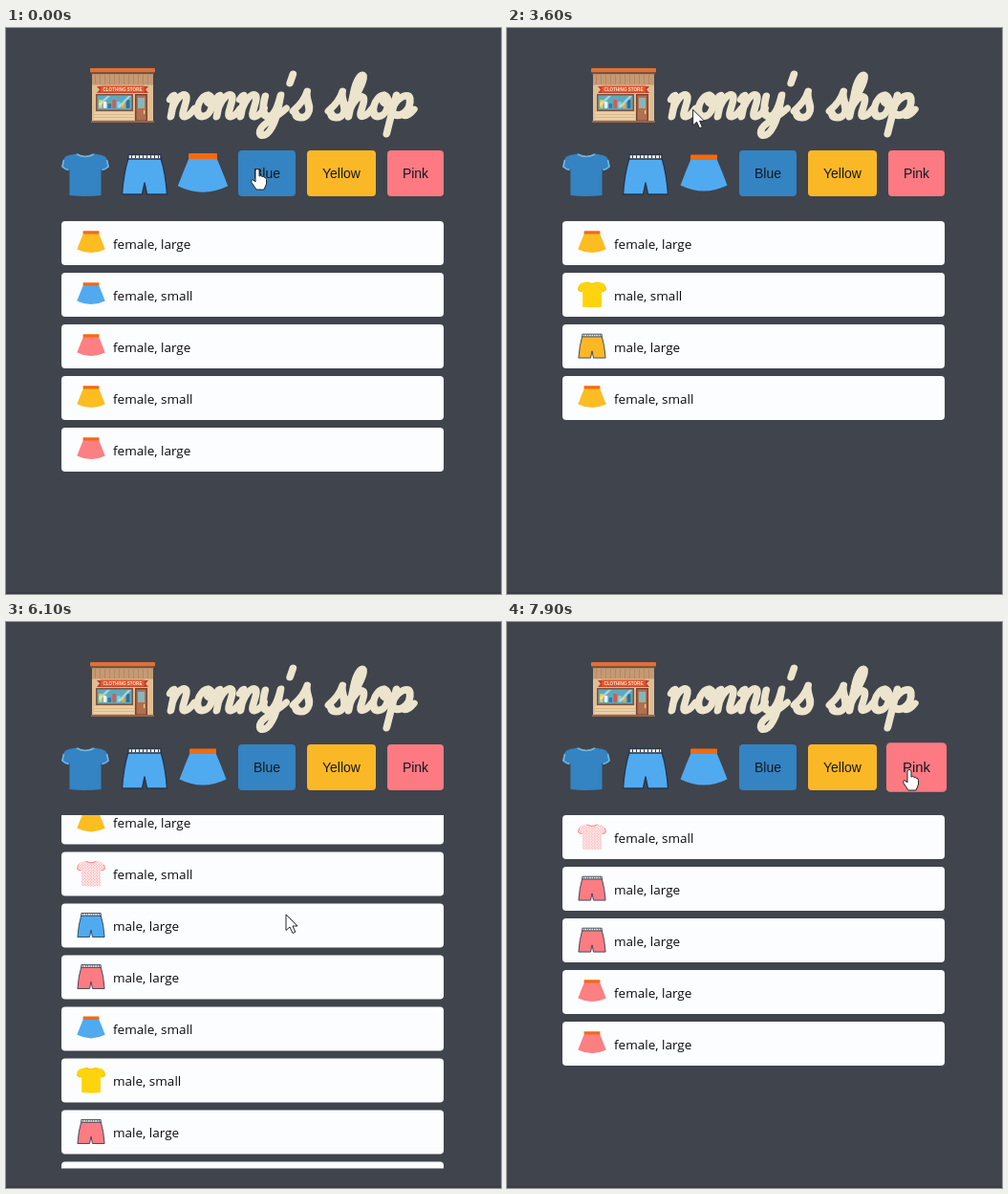
These frames come from a looping animation (518 by 592 pixels, 8000 ms). An HTML page:

```html
<!DOCTYPE html>
<html lang="en">
<head>
<meta charset="utf-8">
<title>nonny's shop</title>
<style>
  html, body { margin: 0; width: 100%; height: 100%; overflow: hidden; background: #40444c; }
  svg { display: block; width: 518px; height: 592px; }
  .row { font: 13.5px "Open Sans", "Noto Sans", sans-serif; fill: #0b0b0d; }
  .btn { font: 14px "Liberation Sans", Arial, sans-serif; fill: #15171c; text-anchor: middle; }
  .sign { font: bold 4.6px "Liberation Sans", Arial, sans-serif; fill: #fbe9d0; text-anchor: middle; }
  .script { fill: none; stroke: #ece4cc; stroke-width: 7.8; stroke-linecap: round; stroke-linejoin: round; }
</style>
</head>
<body>
<svg id="stage" viewBox="0 0 518 592"></svg>
<script>
const LOOP = 8000, STEP = 100;
const stage = document.getElementById('stage');
const rect = (x, y, w, h, fill, r = 0) =>
  `<rect x="${x}" y="${y}" width="${w}" height="${h}" rx="${r}" fill="${fill}"/>`;
const path = (d, fill, extra = '') => `<path d="${d}" fill="${fill}" ${extra}/>`;
const at = (x, y, body, s = 1) => `<g transform="translate(${x} ${y}) scale(${s})">${body}</g>`;

// Garments live in a 50 x 50 box.
const cloth = {
  tee: { blue: '#3483c2', yellow: '#ffd40c', pink: 'url(#dots)' },
  shorts: { blue: '#50aaf0', yellow: '#fbb726', pink: '#fb7c83' },
  skirt: { blue: '#50aaf0', yellow: '#fbbd22', pink: '#fc7f82' }
};
const cuffs = { blue: '#72b4e2', yellow: '#f3c404', pink: '#fa8d92' };

const garment = {
  tee(c) {
    return path('M16 3.5Q25 8 34 3.5L42 5Q46.500 6 47.500 9L50 17Q47 20.500 42.500 21L41.500 19V47Q25 49 8.500 47V19L7.500 21Q3 20.500 0 17L2.500 9Q3.500 6 8 5Z', cloth.tee[c]) +
      path('M16 4Q25 9 34 4M2.500 10L1 17Q4 20 7.500 20.300M47.500 10L49 17Q46 20 42.500 20.300', 'none', `stroke="${cuffs[c]}" stroke-width="1.700"`);
  },
  shorts(c) {
    const line = 'stroke="#26364f" stroke-width="1.400" stroke-linejoin="round"';
    return path('M8 8H42Q47 24 48.500 46H27.500L25 34L22.500 46H1.500Q3 24 8 8Z', cloth.shorts[c], line) +
      path('M8 4.500H42V9H8Z', '#f6f1e6', line) +
      path('M11 6.700H41', 'none', 'stroke="#34373d" stroke-width="3" stroke-dasharray="1 3"');
  },
  skirt(c) {
    return path('M11.500 9H38.500Q44 22 49.500 36.500Q25 48.500 .5 36.500Q6 22 11.500 9Z', cloth.skirt[c]) +
      rect(11, 4.5, 28, 5.5, '#f26a12', 1);
  }
};

function shop() {
  let s = rect(90, 47, 64, 51, '#e0bd92') + rect(88, 42, 68, 4.5, '#df7038', 1) + rect(89, 46.5, 66, 2, '#7d4c36');
  s += rect(90, 48.5, 64, 11, '#c49a74');
  for (let x = 93; x < 153; x += 5) s += rect(x, 49, .8, 10, '#b1845f');
  s += path('M95 61H149L146 64.500L149 68H95L98 64.500Z', '#b93f2b') + rect(99, 60.5, 46, 7, '#e2542f');
  s += '<text class="sign" x="122" y="65.700">CLOTHING STORE</text>';
  s += rect(94, 69, 39, 18, '#80533e') + rect(95.5, 70.5, 36, 15, '#5fa9bd');
  ['#e9c84a', '#f4f3e6', '#3a78a5', '#d9594d', '#8bcfca', '#eda53e', '#316f90'].forEach((c, i) => {
    s += rect(97 + i * 4.8, 75 + i % 3 * 2, 3.6, 9 - i % 3 * 2, c, 1);
  });
  s += path('M97 79L106 71H109L98 82ZM117 82L128 71H131L120 83Z', '#e6f7f6', 'opacity=".55"');
  s += rect(92, 88, 42, 9, '#ecd0a6');
  for (let y = 90; y < 97; y += 3) s += rect(92, y, 42, .7, '#d3ad83');
  s += rect(135, 69, 13, 28, '#79452f') + rect(136.5, 70.5, 10, 26, '#b3704e') + rect(138, 73, 7, 11, '#87b6bd');
  return s + rect(144, 86, 1.2, 4, '#f0d48d') + rect(89, 97, 66, 2, '#906650');
}

const glyphs = {
  n: 'M0-18Q3-25 4.500-19L4 0M4-7C6-18 11-24 15-22C19-20 16-10 16-4C16 2 22 2 27-8',
  o: 'M11-22C1-22-1 0 9 0C19 0 20-19 11-22C9-14 16-11 23-16',
  y: 'M1-21C0-8 2 0 8 0C13 0 16-8 17-22C17-4 17 10 10 18C4 23-1 16 4 10C8 5 18 0 25-8',
  "'": 'M4-44L2.500-35',
  s: 'M0-6C6-12 10-18 11-26C10-18 19-10 16-3C14 3 5 2 3-3',
  h: 'M0-8C8-18 14-36 12-42C9-46 5-38 5-26L4 0M4-6C6-16 11-22 15-20C19-18 16-8 16-4C16 2 22 1 27-8',
  p: 'M4-22L1 18M3-10C6-20 16-26 19-18C22-8 14 1 6-2M15-2Q20 1 25-7'
};
const places = [0, 28, 48, 73, 98, 120, 131, 0, 168, 186, 212, 232];
const title = `<g role="img" aria-label="nonny's shop" class="script" transform="translate(168.500 92.500) skewX(-10)">` +
  [..."nonny's shop"].map((c, i) => c === ' ' ? '' : `<path transform="translate(${places[i]})" d="${glyphs[c]}"/>`).join('') + '</g>';

const button = (x, w, fill, label) =>
  rect(x, 128, w, 48, fill, 4) + `<text class="btn" x="${x + w / 2}" y="157">${label}</text>`;

// kind, colour, label
const items = [
  'skirt yellow female, large', 'tee pink female, small', 'shorts blue male, large',
  'shorts pink male, large', 'skirt blue female, small', 'tee yellow male, small',
  'shorts pink male, large', 'shorts yellow male, large', 'tee blue female, large',
  'skirt pink female, large', 'skirt yellow female, small', 'tee blue male, large',
  'skirt pink female, large'
].map(s => {
  const [kind, color, sex, size] = s.split(' ');
  return { kind, color, label: sex + ' ' + size };
});

const row = (it, i) => at(58, 202 + 54 * i,
  rect(0, 0, 400, 46, '#fcfdff', 4) + at(16, 7.5, garment[it.kind](it.color), .6) +
  `<text class="row" x="54" y="29">${it.label}</text>`);

const views = {
  skirt: it => it.kind === 'skirt',
  blue: it => it.color === 'blue',
  yellow: it => it.color === 'yellow',
  all: () => true,
  pink: it => it.color === 'pink'
};

// Hover targets: box, art, time entered, time left
const targets = [
  { box: [88, 42, 68, 56], art: shop(), on: 3600, off: 5500 },
  { box: [58, 128, 50, 50], art: at(58, 128, garment.tee('blue')) },
  { box: [120, 128, 50, 50], art: at(120, 128, garment.shorts('blue')) },
  { box: [181, 128, 50, 50], art: at(181, 128, garment.skirt('blue')), on: -900, off: 0 },
  { box: [243, 128, 60, 48], art: button(243, 60, '#3483c2', 'Blue'), on: 0, off: 2000 },
  { box: [315, 128, 72, 48], art: button(315, 72, '#fbb826', 'Yellow'), on: 2100, off: 3200 },
  { box: [399, 128, 59, 48], art: button(399, 59, '#fd7a82', 'Pink'), on: 7150, off: 9000 }
];

stage.innerHTML = `<defs>
  <pattern id="dots" width="5" height="5" patternUnits="userSpaceOnUse">${rect(0, 0, 5, 5, '#fff1f0')}
    <circle cx="1.300" cy="1.300" r="1.100" fill="#f9a0a4"/><circle cx="3.800" cy="3.800" r="1.100" fill="#f9a0a4"/></pattern>
  <clipPath id="port"><rect x="58" y="202" width="400" height="369.500"/></clipPath></defs>` +
  rect(0, 0, 518, 592, '#40444c') + rect(0, 590, 518, 2, '#3b3c45') + title +
  targets.map(o => `<g class="target">${o.art}</g>`).join('') +
  '<g clip-path="url(#port)">' + Object.keys(views).map(k =>
    `<g id="${k}">${items.filter(views[k]).map(row).join('')}</g>`).join('') + '</g>' +
  '<g id="cursor" stroke="#24262c" stroke-linejoin="round">' +
  path('M-2 1.500Q0-1 2 1.500V8Q4 6.500 5 8.500Q7 7.500 7.500 9.500Q9.500 9 9.500 11.500V16L7 22H-1L-6 14.500Q-7 11-4 12L-2 14Z', '#fff', 'id="hand"') +
  path('M0 0V16.500L4 13L7 19.500L9.800 18.200L7 12H12Z', '#fff', 'id="arrow"') + '</g>';

const $ = id => document.getElementById(id);
const groups = [...document.querySelectorAll('.target')];
const clamp = v => Math.max(0, Math.min(1, v));
const ease = v => v * v * (3 - 2 * v);

// Eased value of a track of [time, ...numbers]
function track(keys, t) {
  let i = 0;
  while (i < keys.length - 2 && t >= keys[i + 1][0]) i++;
  const [a, b] = [keys[i], keys[i + 1]];
  const k = ease(clamp((t - a[0]) / (b[0] - a[0])));
  return a.slice(1).map((v, n) => v + (b[n + 1] - v) * k);
}

const moves = [
  [0, 263, 147], [400, 278, 149], [1900, 278, 149], [2400, 356, 157], [3000, 356, 157],
  [3300, 330, 108], [3800, 121, 73], [4600, 121, 73], [4800, 121, 70],
  [5400, 121, 70], [6000, 293, 306], [6900, 293, 306], [7300, 421, 154], [8000, 421, 154]
];
const scrolls = [[6050, 0], [6250, 100], [6300, 100], [6500, 201], [6550, 201], [6750, 301], [6850, 332]];
const clicks = [[0, 'skirt'], [600, 'blue'], [2500, 'yellow'], [4900, 'all'], [7600, 'pink']];

function draw(t) {
  const [x, y] = track(moves, t);
  let over = false;
  targets.forEach((o, i) => {
    const [bx, by, w, h] = o.box, cx = bx + w / 2, cy = by + h / 2;
    over = over || (x >= bx && x <= bx + w && y >= by && y <= by + h);
    const k = o.off === undefined ? 0 : ease(clamp((t - o.on) / 200)) * (1 - ease(clamp((t - o.off) / 200)));
    groups[i].setAttribute('transform', `translate(${cx} ${cy}) scale(${1 + .07 * k}) translate(${-cx} ${-cy})`);
  });
  const view = clicks.filter(c => c[0] <= t).pop()[1];
  for (const k in views) $(k).style.display = k === view ? '' : 'none';
  $('all').setAttribute('transform', `translate(0 ${-track(scrolls, t)[0]})`);
  $('cursor').setAttribute('transform', `translate(${x} ${y})`);
  $('hand').style.display = over ? '' : 'none';
  $('arrow').style.display = over ? 'none' : '';
}

const start = performance.now();
function tick() {
  const t = (performance.now() - start) % LOOP;
  draw(Math.floor(t / STEP) * STEP);
  requestAnimationFrame(tick);
}
draw(0);
requestAnimationFrame(tick);
</script>
</body>
</html>
```
